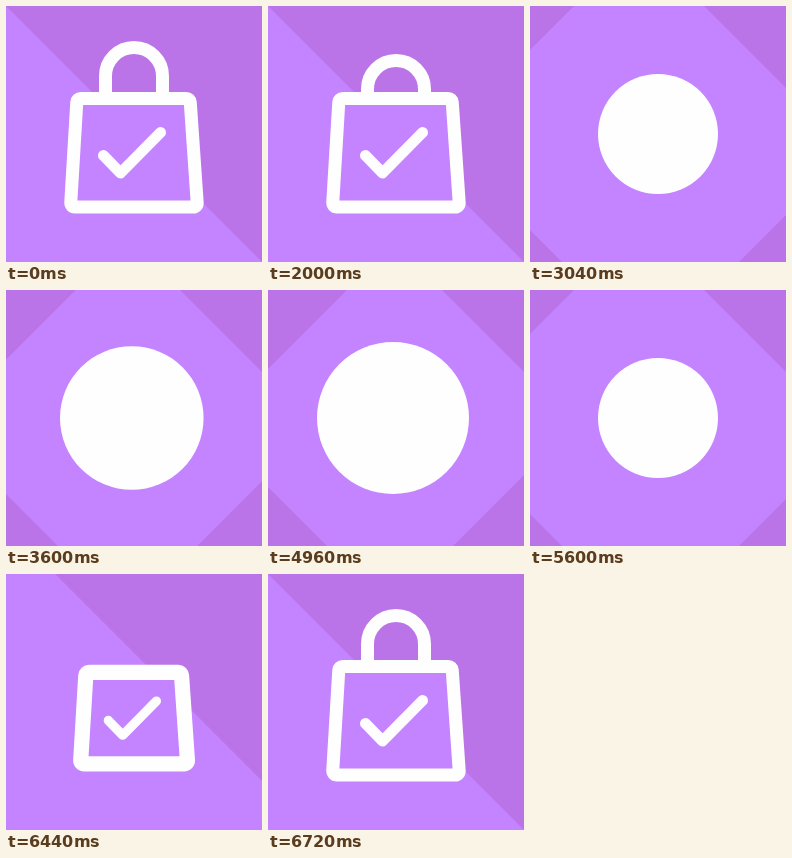
Recreate the animation shown at these times as an HTML page with a canvas. Size 256 by 256 pixels, loop 8.32 s.

```html
<!DOCTYPE html>
<html lang="en">
<head>
<meta charset="utf-8">
<title>Bag check</title>
<style>
  html, body { margin: 0; width: 100%; height: 100%; overflow: hidden; background: #c483ff; }
  canvas { display: block; width: 100vw; height: 100vh; }
</style>
</head>
<body>
<canvas id="stage" width="256" height="256"></canvas>
<script>
const LOOP = 8320, STEP = 40, SIZE = 256;
const LIGHT = '#c483ff', DARK = '#ba74e7', WHITE = '#fefefe';
const canvas = document.getElementById('stage');
const g = canvas.getContext('2d');

const mix = (a, b, p) => a + (b - a) * p;
const smooth = p => p * p * (3 - 2 * p);

// Piecewise linear value through [time, value] points.
function track(t, points) {
  if (t <= points[0][0]) return points[0][1];
  for (let i = 1; i < points.length; i++) {
    const [t0, v0] = points[i - 1], [t1, v1] = points[i];
    if (t <= t1) return mix(v0, v1, (t - t0) / (t1 - t0));
  }
  return points[points.length - 1][1];
}

// Pose clock: 0 is the large disc, 1760 is the complete bag.
function poseAt(t) {
  if (t < 2000) return 1760;
  if (t < 4960) return track(t, [[2000, 1720], [3040, 640], [3800, 0]]);
  return Math.min(t - 4960, 1760);
}

function triangle(x, y, size) {
  const dx = x ? -size : size, dy = y ? -size : size;
  g.beginPath();
  g.moveTo(x, y);
  g.lineTo(x + dx, y);
  g.lineTo(x, y + dy);
  g.fill();
}

function background(s) {
  g.fillStyle = LIGHT;
  g.fillRect(0, 0, SIZE, SIZE);
  g.fillStyle = DARK;
  const corner = (big, small) => track(s, [[0, big], [640, small], [800, 0]]);
  triangle(0, 0, corner(79, 44));
  triangle(0, SIZE, corner(59, 32));
  triangle(SIZE, SIZE, corner(71, 47));
  triangle(SIZE, 0, track(s, [[640, 82], [1120, 96], [1640, 256]]));
}

function disc(s) {
  const x = track(s, [[0, 125], [640, 128], [800, 128.5]]);
  const y = track(s, [[0, 128], [640, 128], [800, 130]]);
  const r = track(s, [[0, 76], [640, 60], [800, 13.5]]);
  g.fillStyle = WHITE;
  g.beginPath();
  g.arc(x, y, r, 0, 7);
  g.fill();
}

// Grows a shape out of the dot as k goes from 0 to 1.
const grow = (points, k) => points.map(([x, y]) => [mix(128.5, x, k), mix(130, y, k)]);

function roundedPath(points, r) {
  const [a, b] = points;
  g.beginPath();
  g.moveTo((a[0] + b[0]) / 2, (a[1] + b[1]) / 2);
  points.forEach((_, i) => {
    const p = points[(i + 1) % points.length], q = points[(i + 2) % points.length];
    g.arcTo(...p, ...q, r);
  });
  g.closePath();
}

function handle(s) {
  const y = 70 + track(s, [[1600, 52], [1640, 40], [1680, 26], [1720, 13], [1760, 0]]);
  g.lineWidth = 13;
  g.beginPath();
  g.moveTo(99.5, y + 22);
  g.arc(128, y, 28.5, Math.PI, 0);
  g.lineTo(156.5, y + 22);
  g.stroke();
}

function bag(s) {
  const k = smooth(track(s, [[1120, 0], [1600, 1]]));
  g.strokeStyle = WHITE;
  g.lineJoin = g.lineCap = 'round';
  if (s > 1600) handle(s);
  roundedPath(grow([[71, 92.5], [184, 92.5], [191.5, 201], [64.5, 201]], k), 4 * k);
  g.fillStyle = LIGHT;
  g.fill();
  g.lineWidth = mix(27, 13, k);
  g.stroke();
  g.beginPath();
  for (const p of grow([[97.5, 149.5], [114.5, 167], [154.5, 126.5]], k)) g.lineTo(...p);
  g.lineWidth = 11 * k + 0.01;
  g.stroke();
}

function draw(now) {
  const t = Math.floor((now % LOOP) / STEP) * STEP;
  const s = poseAt(t);
  const scale = Math.min(innerWidth, innerHeight) / SIZE * (window.devicePixelRatio || 1);
  const side = Math.max(1, Math.round(SIZE * scale));
  if (canvas.width !== side) canvas.width = canvas.height = side;
  g.setTransform(side / SIZE, 0, 0, side / SIZE, 0, 0);
  background(s);
  if (s <= 1120) disc(s);
  else bag(s);
}

const start = performance.now();
function tick() {
  draw(performance.now() - start);
  requestAnimationFrame(tick);
}
tick();
</script>
</body>
</html>
```
